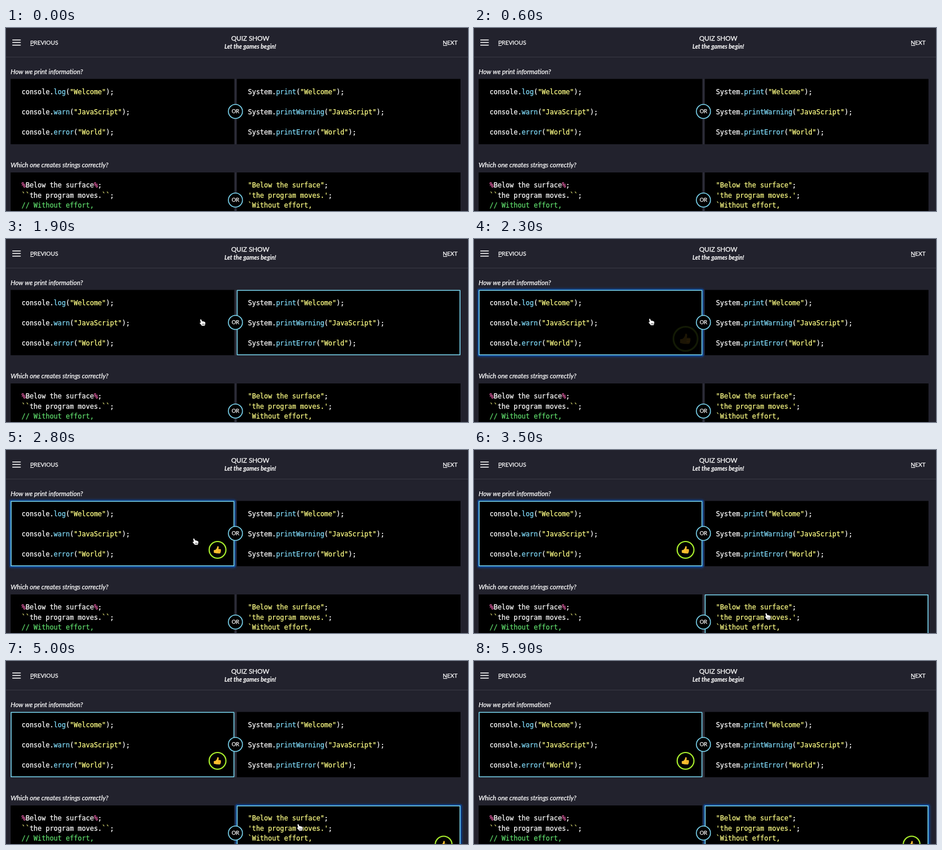
These frames come from a looping animation (800 px wide and 318 px high, 6 s). An HTML page with a canvas:

```html
<!DOCTYPE html>
<html lang="en">
<head>
<meta charset="utf-8">
<title>Quiz Show</title>
<style>
  html, body { margin: 0; width: 100%; height: 100%; overflow: hidden; background: #22222d; }
  canvas { display: block; width: 800px; height: 318px; }
</style>
</head>
<body>
<canvas id="stage"></canvas>
<script>
const W = 800, H = 318, LOOP = 6000, STEP = 100;
const canvas = document.getElementById('stage');
const ctx = canvas.getContext('2d');
const ratio = window.devicePixelRatio || 1;
canvas.width = W * ratio;
canvas.height = H * ratio;

const SANS = 'Lato, sans-serif';
const MONO = '11.55px "DejaVu Sans Mono", monospace';
const BG = '#22222d', CYAN = '#7ad4ee', WHITE = '#ffffff';
const YELLOW = '#ffff86', PINK = '#ff69b8', GREEN = '#5fdc6c', BLUE = '#80dcfa';

const panels = [
  { x: 8, y: 88.5, w: 387.5, h: 113.5, click: 2250 },
  { x: 399.5, y: 88.5, w: 387.5, h: 113.5 },
  { x: 8, y: 251, w: 387.5, h: 97 },
  { x: 399.5, y: 251, w: 387.5, h: 97, click: 3800 }
];
const FOCUS_END = 3800;

// time, x, y
const path = [
  [600, 815, 165], [1050, 283, 146], [1350, 283, 146], [1600, 520, 146],
  [1700, 500, 146], [1900, 340, 145], [2150, 307, 144], [2700, 307, 144],
  [3200, 508.5, 289], [5100, 508.5, 289], [5400, 530, 340]
];

const clamp = v => Math.max(0, Math.min(1, v));
const smooth = v => v * v * (3 - 2 * v);

function pointerAt(t) {
  const next = path.findIndex(p => p[0] > t);
  if (next < 1) return null;
  const [a, b] = [path[next - 1], path[next]];
  const k = smooth((t - a[0]) / (b[0] - a[0]));
  return { x: a[1] + (b[1] - a[1]) * k, y: a[2] + (b[2] - a[2]) * k };
}

function rect(x, y, w, h, color) {
  ctx.fillStyle = color;
  ctx.fillRect(x, y, w, h);
}

// A hairline stroke gives the letters a slightly heavier weight.
function text(str, x, y, font, color = WHITE, align = 'left', weight = 0.25) {
  ctx.font = font;
  ctx.textAlign = align;
  ctx.fillStyle = ctx.strokeStyle = color;
  ctx.lineWidth = weight;
  ctx.lineJoin = 'round';
  ctx.fillText(str, x, y);
  ctx.strokeText(str, x, y);
}

function code(x, y, ...parts) {
  for (const [str, color] of parts) {
    text(str, x, y, MONO, color);
    x += ctx.measureText(str).width;
  }
}

function call(x, y, object, method, value) {
  code(x, y, [object + '.', WHITE], [method, BLUE], ['(', WHITE],
    [`"${value}"`, YELLOW], [');', WHITE]);
}

function disc(x, y, r, fill, stroke, width) {
  ctx.beginPath();
  ctx.arc(x, y, r, 0, Math.PI * 2);
  ctx.fillStyle = fill;
  ctx.fill();
  ctx.strokeStyle = stroke;
  ctx.lineWidth = width;
  ctx.stroke();
}

function header() {
  rect(0, 50, W, 1, '#383843');
  for (const y of [20, 24.5, 29]) rect(11, y, 14.5, 1.5, WHITE);
  const nav = '10px ' + SANS;
  text('PREVIOUS', 42, 29, nav);
  rect(42, 30, 6, 1, WHITE);
  text('NEXT', 782, 29, nav, WHITE, 'right');
  rect(757, 30, 7, 1, WHITE);
  text('QUIZ SHOW', 423, 22, '11.4px ' + SANS, WHITE, 'center');
  text('Let the games begin!', 423, 36, 'italic bold 10.4px ' + SANS, WHITE, 'center', 0.1);
}

function snippets() {
  const rows = [['log', 'print', 'Welcome'], ['warn', 'printWarning', 'JavaScript'],
    ['error', 'printError', 'World']];
  rows.forEach(([left, right, value], i) => {
    const y = 114.7 + i * 35;
    call(27, y, 'console', left, value);
    call(419, y, 'System', right, value);
  });
  code(27, 277.2, ['%', PINK], ['Below the surface', WHITE], ['%', PINK], [';', WHITE]);
  code(27, 295, ['``', YELLOW], ['the program moves.', WHITE], ['``', YELLOW], [';', WHITE]);
  code(27, 312.3, ['// Without effort,', GREEN]);
  code(419, 277.2, ['"Below the surface"', YELLOW], [';', WHITE]);
  code(419, 295, ["'the program moves.'", YELLOW], [';', WHITE]);
  code(419, 312.3, ['`Without effort,', YELLOW]);
}

function thumb() {
  ctx.fillStyle = '#fbc130';
  ctx.beginPath();
  ctx.moveTo(-6.5, 0.5);
  ctx.lineTo(-3.5, 0);
  ctx.quadraticCurveTo(-0.8, -2, -0.4, -5.5);
  ctx.quadraticCurveTo(0.8, -7.5, 1.9, -5.2);
  ctx.quadraticCurveTo(2.2, -3.4, 1.5, -1.2);
  ctx.lineTo(5, -1.2);
  ctx.quadraticCurveTo(6.6, -0.3, 5.7, 1.2);
  ctx.quadraticCurveTo(6.6, 2.4, 5.3, 3.4);
  ctx.quadraticCurveTo(5.6, 6.2, 2.8, 6.2);
  ctx.lineTo(-2, 6);
  ctx.lineTo(-6.5, 5);
  ctx.closePath();
  ctx.fill();
  ctx.strokeStyle = '#d98516';
  ctx.lineWidth = 0.6;
  ctx.beginPath();
  for (const y of [1.2, 3.5]) {
    ctx.moveTo(1.2, y);
    ctx.lineTo(5.3, y);
  }
  ctx.stroke();
}

function badge(panel, t) {
  const k = clamp((t - panel.click) / 450);
  if (k === 0) return;
  ctx.save();
  ctx.translate(panel.x + 358.3, panel.y + (panel.y < 200 ? 85 : 68));
  const scale = 1.5 - 0.5 * k;
  ctx.scale(scale, scale);
  ctx.globalAlpha = k;
  disc(0, 0, 14.5, '#000', '#a9ee2d', 2.1);
  thumb();
  ctx.restore();
}

function drawPanel(panel, t, hover) {
  const { x, y, w, h, click } = panel;
  const chosen = t >= click;
  const focused = chosen && (y > 200 || t < FOCUS_END);
  if (focused) {
    ctx.save();
    ctx.shadowColor = '#0b4ba8';
    ctx.shadowBlur = 4 * ratio;
    rect(x - 1.5, y - 1.5, w + 3, h + 3, '#0d4a9e');
    ctx.restore();
  }
  rect(x, y, w, h, '#000');
  if (!chosen && !hover) return;
  ctx.strokeStyle = CYAN;
  ctx.lineWidth = 1.6;
  ctx.strokeRect(x + 0.8, y + 0.8, w - 1.6, h - 1.6);
}

function hand({ x, y }) {
  ctx.save();
  ctx.translate(x, y);
  ctx.beginPath();
  ctx.moveTo(-3.8, -4.5);
  ctx.quadraticCurveTo(-2.8, -6.2, -1.6, -4.6);
  ctx.lineTo(-0.6, -1.8);
  ctx.quadraticCurveTo(0.8, -2.8, 1.5, -1.4);
  ctx.quadraticCurveTo(2.9, -2.2, 3.4, -0.9);
  ctx.quadraticCurveTo(5.2, -1.2, 5.2, 0.8);
  ctx.quadraticCurveTo(5.3, 3, 4, 5.7);
  ctx.lineTo(-1, 5.7);
  ctx.quadraticCurveTo(-2.2, 3.5, -4.5, 1.6);
  ctx.quadraticCurveTo(-5.2, -0.2, -2.6, 0.7);
  ctx.closePath();
  ctx.strokeStyle = '#000';
  ctx.lineWidth = 1.6;
  ctx.stroke();
  ctx.fillStyle = '#fff';
  ctx.fill();
  ctx.lineWidth = 0.6;
  ctx.beginPath();
  for (const dx of [0, 1.6, 3.2]) {
    ctx.moveTo(dx, 2);
    ctx.lineTo(dx, 4.4);
  }
  ctx.stroke();
  ctx.restore();
}

function draw(t) {
  ctx.setTransform(ratio, 0, 0, ratio, 0, 0);
  rect(0, 0, W, H, BG);
  header();
  const question = 'italic 11.35px ' + SANS;
  text('How we print information?', 8, 80, question);
  text('Which one creates strings correctly?', 8, 242, question);
  rect(395, 88.5, 5, 113.5, '#2c2c38');
  rect(395, 251, 5, 67, '#2c2c38');

  // Hover highlighting trails the pointer by one step.
  const trail = pointerAt(t - STEP);
  for (const p of panels) {
    const hover = trail && trail.x >= p.x && trail.x < p.x + p.w &&
      trail.y >= p.y && trail.y < p.y + p.h;
    drawPanel(p, t, hover);
  }
  snippets();
  for (const y of [145, 299]) {
    disc(397.3, y, 12.2, '#000', CYAN, 1.6);
    text('OR', 397.3, y + 3.4, '9.3px ' + SANS, WHITE, 'center');
  }
  for (const p of panels) if (p.click) badge(p, t);
  const pointer = pointerAt(t);
  if (pointer) hand(pointer);
}

const start = performance.now();
function tick() {
  const t = (performance.now() - start) % LOOP;
  draw(Math.floor(t / STEP) * STEP);
  requestAnimationFrame(tick);
}
tick();
</script>
</body>
</html>
```
